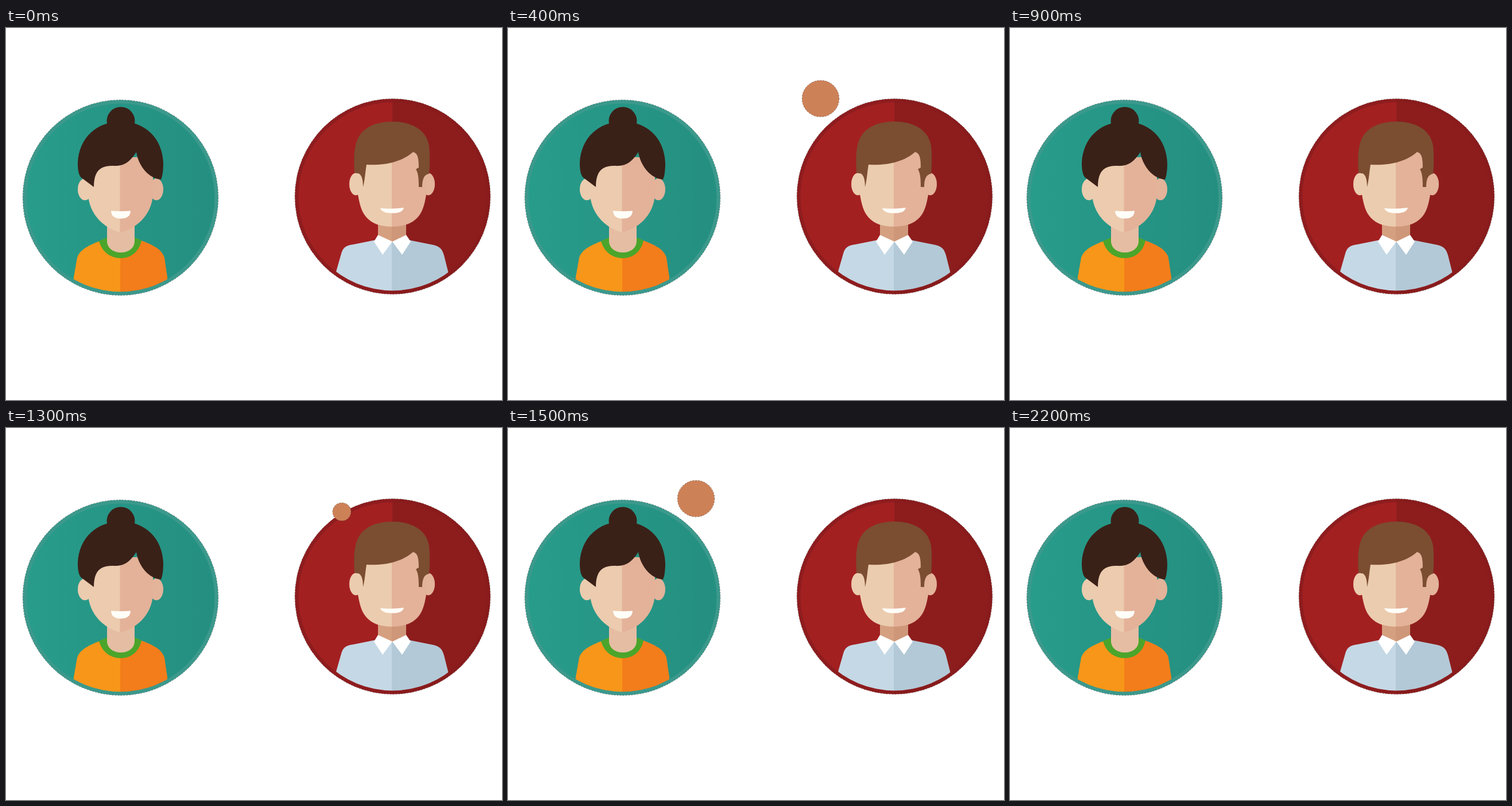
Recreate the animation shown at these times as an HTML page. Size 864 px wide and 648 px high, loop 2.4 s.

```html
<!DOCTYPE html>
<html lang="en">
<head>
<meta charset="utf-8">
<title>Coin exchange</title>
<style>
  html, body { margin: 0; width: 100%; height: 100%; overflow: hidden; background: #fff; }
  svg { display: block; width: 100%; height: 100%; }
  .edge { stroke: #302a2a; stroke-width: .8; stroke-dasharray: 2 3; stroke-opacity: .7; }
</style>
</head>
<body>
<svg viewBox="0 0 864 648">
  <defs>
    <linearGradient id="teal"><stop stop-color="#289c8b"/><stop offset="1" stop-color="#248f80"/></linearGradient>
    <clipPath id="womanClip"><circle cx="199.5" cy="295.5" r="164"/></clipPath>
    <clipPath id="manClip"><circle cx="673.5" cy="293.5" r="164"/></clipPath>
  </defs>

  <g id="woman">
    <circle class="edge" cx="199.5" cy="295.5" r="170.3" fill="#3b998c"/>
    <circle cx="199.5" cy="295.5" r="164" fill="url(#teal)"/>
    <path clip-path="url(#womanClip)" fill="url(#orange)" d="M112 470L118 434 124 400C128 387 142 379 166 370H235C260 379 272 387 276 400L281 434 286 470Z"/>
    <path fill="#4ba52b" d="M162 371L176 365H224L236 370C232 390 217 401 200 401 182 401 167 390 162 371Z"/>
    <path fill="#e5bda3" d="M176 335H224V371C224 383 214 391 200 391 186 391 176 383 176 371Z"/>
    <ellipse cx="137.500" cy="281" rx="12.500" ry="19" fill="#ecccae"/>
    <ellipse cx="262" cy="281" rx="12" ry="19" fill="#e3b39a"/>
    <path fill="url(#womanSkin)" d="M143 225H256V291C253 328 225 350 199 356 174 350 146 328 143 291Z"/>
    <circle cx="200" cy="162" r="24.500" fill="#3a2118"/>
    <path fill="#3a2118" d="M153 277L133 262C127 259 125 248 125 235 127 192 157 163 200 163 243 163 272 192 274 235 274 247 273 257 270 264 247 262 230 238 227 216 214 237 202 241 185 240 161 240 153 253 153 277Z"/>
    <path fill="#fffdf8" d="M183 318.500Q200 320 217 318.500C217 328 210 332 200 332S183 328 183 318.500Z"/>
  </g>

  <g id="man">
    <circle class="edge" cx="673.5" cy="293.5" r="170.3" fill="url(#redRing)"/>
    <circle cx="673.5" cy="293.5" r="164" fill="url(#red)"/>
    <path clip-path="url(#manClip)" fill="url(#blue)" d="M563 470L576 421 584 393C587 382 592 379 605 377L645 369H700L745 378C757 381 760 386 763 396L770 424 782 470Z"/>
    <path fill="url(#manNeck)" d="M648 330H697V362L673 373 648 362Z"/>
    <path fill="#fff" d="M648 360.500L673 372 656 395 641 372ZM697 360.500L673 372 690 395 705 372Z"/>
    <ellipse cx="609.500" cy="272" rx="11.500" ry="19.500" fill="#ecccae"/>
    <ellipse cx="735.500" cy="272" rx="11.500" ry="19.500" fill="#e3b39a"/>
    <path fill="url(#manSkin)" d="M613 210H732V290C729 309 725 321 717 330 707 341 691 346 672 346 653 346 638 341 628 330 619 320 616 307 613 290Z"/>
    <path fill="#7b4d31" d="M622 277C622 261 618 253 612 253L607 252C606 234 606 216 609 204 615 176 640 163 673 163 705 163 732 176 737 205 739 224 738 244 737 254 728 255 725 264 725 277H719C719 262 718 252 714 246L719 243C719 229 718 218 709 216 690 233 660 240 628 238 626 250 625 266 622 277Z"/>
    <path fill="#fffdf8" d="M652 314Q673 316 693 313C691 320 685 322.500 673 322.500S654 320 652 314Z"/>
  </g>

  <ellipse id="coin" class="edge" fill="#cd8157" visibility="hidden"/>
</svg>
<script>
const defs = document.querySelector("defs");
const coin = document.getElementById("coin");

// Two flat tones meeting at a vertical line.
function addSplitFill(id, x, left, right) {
  defs.insertAdjacentHTML("beforeend",
    `<linearGradient id="${id}" gradientUnits="userSpaceOnUse" x1="${x - .5}" x2="${x + .5}" y1="0" y2="0">
      <stop stop-color="${left}"/><stop offset="1" stop-color="${right}"/></linearGradient>`);
}
addSplitFill("orange", 199, "#f89619", "#f37d1a");
addSplitFill("womanSkin", 198.5, "#eccbae", "#e3b299");
addSplitFill("red", 673, "#a32021", "#8d1d1d");
addSplitFill("redRing", 673, "#8e1c1e", "#891b1c");
addSplitFill("blue", 672, "#c5d8e5", "#b3c9d7");
addSplitFill("manNeck", 672, "#d5a080", "#cf9779");
addSplitFill("manSkin", 672, "#ecccae", "#e3b299");

const LOOP = 2400, STEP = 50, CENTER = 436;
// Half of the symmetric flight: distance from center, height, radius.
const flight = [[149, 146, 16], [108.5, 123, 32.3], [37, 111, 48.6]];

function placeCoin(step, direction) {
  const early = step < 3;
  const [distance, y, radius] = flight[early ? step : 5 - step];
  coin.setAttribute("cx", CENTER + direction * (early ? -distance : distance));
  coin.setAttribute("cy", y);
  coin.setAttribute("rx", radius);
  coin.setAttribute("ry", radius * .985);
}

function draw() {
  const time = performance.now() % LOOP;
  const returning = time >= 1300;
  const step = Math.floor((time - (returning ? 1300 : 200)) / STEP);
  const flying = step >= 0 && step < 6;
  coin.setAttribute("visibility", flying ? "visible" : "hidden");
  if (flying) placeCoin(step, returning ? -1 : 1);
  requestAnimationFrame(draw);
}
draw();
</script>
</body>
</html>
```
